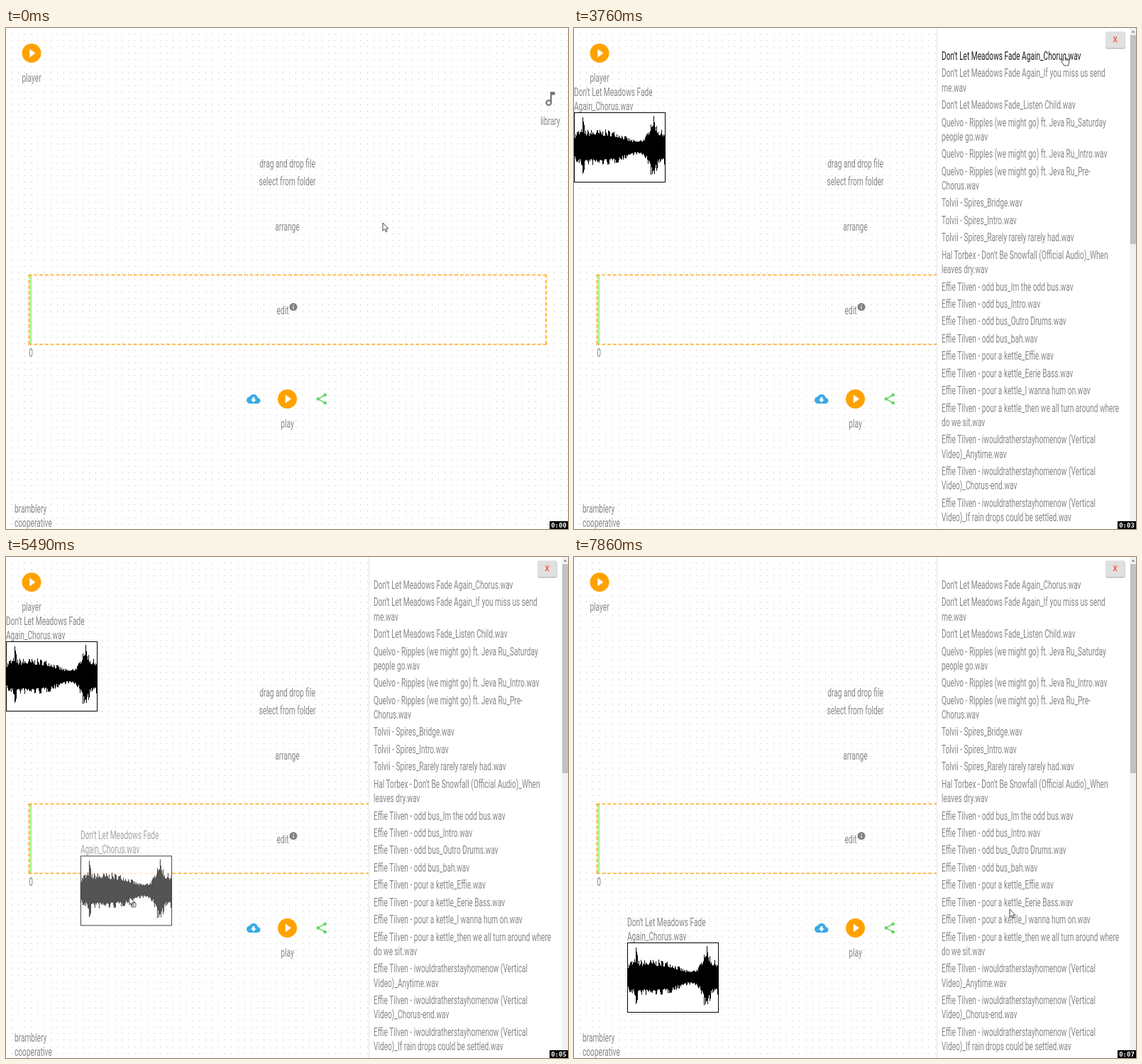
Write an HTML page that moves like this. It is 792x707 px and loops after 8 s.

```html
<!DOCTYPE html>
<html lang="en">
<head>
<meta charset="utf-8">
<title>Sound library</title>
<style>
  html, body { margin: 0; width: 100%; height: 100%; overflow: hidden; background: #fff; }
  svg { display: block; width: 792px; height: 707px; }
  text { font: 400 16px Roboto, "Open Sans", sans-serif; fill: #868686; }
  .mid { text-anchor: middle; }
  .hover text { fill: #1c1c1c; }
  #close text { font-size: 10px; fill: #f22; }
  #clock text { font: 700 9px "DejaVu Sans Mono", monospace; fill: #fff; }
</style>
</head>
<body>
<svg viewBox="0 0 792 707">
  <defs>
    <g id="playIcon">
      <circle r="13.5" fill="#ffa200"/>
      <path d="M-2.7-6V6L5.4 0Z" fill="#fff"/>
    </g>
    <g id="clip"></g>
  </defs>

  <path id="dots" stroke="#bdbdbd"/>
  <g id="page">
    <use href="#playIcon" x="36" y="35.5"/>
    <use href="#playIcon" x="396.5" y="523.5"/>
    <circle id="halo" cx="767" cy="100" r="20" opacity=".055"/>
    <path transform="translate(753.8 86.8) scale(1.1)" fill="#747474" d="M12 3l.01 10.55c-.59-.34-1.27-.55-2-.55C7.79 13 6 14.79 6 17s1.79 4 4.01 4S14 19.21 14 17V7h4V3zm-1.99 16a2 2 0 1 1 0-4 2 2 0 0 1 0 4z"/>
    <rect x="33.6" y="349" width="2.6" height="97" fill="#a9ef90"/>
    <path d="M31.5 348.5H762M31.5 446.5H762M32.4 347.7V447.3M761.2 347.7V447.3" stroke="#ffa716" stroke-width="1.65" stroke-dasharray="4.9 2.9"/>
    <circle cx="405" cy="393.6" r="5.5" fill="#808080"/>
    <path d="M405 390.2v1.3M405 392.8v3.7" stroke="#fff" stroke-width="1.2"/>
    <path transform="translate(339.1 513.8) scale(.81)" fill="#37aae2" d="M19.35 10.04C18.67 6.59 15.64 4 12 4 9.11 4 6.6 5.64 5.35 8.04 2.34 8.36 0 10.91 0 14c0 3.31 2.69 6 6 6h13c2.76 0 5-2.24 5-5 0-2.64-2.05-4.78-4.65-4.96zM17 13l-5 5-5-5h3V9h4v4z"/>
    <g fill="#6ad86a">
      <path d="M449.6 517.8L439.8 523.5L449.6 529.2" fill="none" stroke="#6ad86a" stroke-width="1.5"/>
      <circle cx="449.6" cy="517.8" r="2.4"/>
      <circle cx="439.8" cy="523.5" r="2.4"/>
      <circle cx="449.6" cy="529.2" r="2.4"/>
    </g>
  </g>

  <use id="placed" href="#clip"/>

  <g id="panel">
    <rect x="511" width="281" height="707" fill="#fff"/>
    <path d="M511.5 0V707" stroke="#e6e6e6"/>
    <g id="list"></g>
    <g id="close">
      <rect x="749.5" y="7" width="27" height="23" rx="2.5" opacity=".12"/>
      <rect x="749" y="6" width="28" height="23" rx="2.5" opacity=".16"/>
      <rect x="749" y="5" width="27.5" height="23" rx="2.5" fill="#e0e0e0"/>
      <text class="mid" x="762.7" y="20.2">X</text>
    </g>
    <rect x="783" width="9" height="707" fill="#f1f1f1"/>
    <rect x="784" y="10" width="8" height="295" fill="#c1c1c1"/>
    <path d="M785.5 6.5l2.5-3 2.5 3z" fill="#8a8a8a"/>
  </g>

  <use id="ghost" href="#clip" opacity=".75"/>

  <g id="cursor" stroke="#333" stroke-width=".9" stroke-linejoin="round" fill="#fff">
    <rect id="badge" x="2.5" y="8.5" width="6.5" height="6" rx="1"/>
    <path id="arrow" d="M0 0V11.2L2.6 8.8L4.3 12.8L6 12L4.3 8.2H7.8Z"/>
    <g id="hand">
      <path d="M-1.4 9V1.3a1.4 1.4 0 0 1 2.8 0V6l4.4 1q1.4.4 1.3 2l-.6 3.8-1 3.2h-5.8l-3.6-5.4q-.8-1.8.7-2Z"/>
      <path d="M1.4 6v3M3.4 6.5v2.7M5.2 7v2.4" fill="none"/>
    </g>
  </g>

  <g id="clock">
    <rect x="766" y="696" width="26" height="11"/>
    <text x="768.2" y="705">0:00</text>
  </g>
</svg>

<script>
const LOOP = 8000;
const NARROW = 0.635;   // one horizontal scale for the whole condensed face
const LINE = 20.2;
const $ = id => document.getElementById(id);

function label(parent, str, x, y, cls = "") {
  const el = document.createElementNS("http://www.w3.org/2000/svg", "text");
  el.setAttribute("transform", `translate(${x} ${y}) scale(${NARROW} 1)`);
  el.setAttribute("class", cls);
  el.textContent = str;
  parent.append(el);
}

// Dotted background, each dot on a whole pixel
let dots = "";
for (let y = 8; y < 707; y += 9.1)
  for (let x = 8; x < 792; x += 9.1) dots += `M${Math.round(x)} ${Math.round(y) + 0.5}h1`;
$("dots").setAttribute("d", dots);

// Page labels
[["player", 36, 75.8], ["library", 767, 137.2], ["drag and drop file", 396.5, 197.3],
 ["select from folder", 396.5, 221.9], ["arrange", 396.5, 285.5], ["edit", 390, 403.5],
 ["0", 35, 463.5], ["play", 396.5, 563.9]]
  .forEach(([s, x, y]) => label($("page"), s, x, y, "mid"));
label($("page"), "bramblery", 12, 684);
label($("page"), "cooperative", 12, 684 + LINE);

// Library list; "|" marks a line break
const meadows = "Don't Let Meadows Fade";
const ripples = "Quelvo - Ripples (we might go) ft. Jeva Ru_";
const spires = "Tolvii - Spires_";
const bus = "Effie Tilven - odd bus_";
const kettle = "Effie Tilven - pour a kettle_";
const home = "Effie Tilven - iwouldratherstayhomenow (Vertical|Video)_";
const files = [
  meadows + " Again_Chorus", meadows + " Again_If you miss us send|me",
  meadows + "_Listen Child",
  ripples + "Saturday|people go", ripples + "Intro", ripples + "Pre-|Chorus",
  spires + "Bridge", spires + "Intro", spires + "Rarely rarely rarely had",
  "Hal Torbex - Don't Be Snowfall (Official Audio)_When|leaves dry",
  bus + "Im the odd bus", bus + "Intro", bus + "Outro Drums", bus + "bah",
  kettle + "Effie", kettle + "Eerie Bass", kettle + "I wanna hum on",
  kettle + "then we all turn around where|do we sit",
  home + "Anytime", home + "Chorus-end", home + "If rain drops could be settled"
];
let nextTop = 28.5;
const rows = files.map(name => {
  const el = document.createElementNS("http://www.w3.org/2000/svg", "g");
  const lines = (name + ".wav").split("|");
  const top = nextTop, bottom = top + LINE * lines.length;
  lines.forEach((s, i) => label(el, s, 518, top + 16.5 + i * LINE));
  $("list").append(el);
  nextTop = bottom + 4.27;
  return { el, top, bottom };
});

// Audio clip: title, frame and a seeded waveform
let seed = 7;
const rand = () => (seed = seed * 16807 % 2147483647) / 2147483647;
const bump = (x, center, width) => Math.exp(-(((x - center) / width) ** 2));
const level = x => 25 - 8 * bump(x, 0, 3) + 20 * bump(x, 13, 1.5)
  - 15 * bump(x, 88, 22) + 24 * bump(x, 111, 6);

let wave = "";
for (let x = 0.5; x < 129; x++) {
  const spike = () => level(x) * (0.65 + 0.38 * rand() ** 1.5);
  wave += `M${x} ${168.5 - spike()}V${168.5 + spike()}`;
}
const frame = 'x=".5" y="119.5" width="128" height="98"';
$("clip").innerHTML = `<rect ${frame} fill="#fff"/><path d="${wave}" stroke="#000"/>
  <rect ${frame} fill="none" stroke="#000"/>`;
label($("clip"), meadows, 0, 95.6);
label($("clip"), "Again_Chorus.wav", 0, 95.6 + LINE);

// Stops on a path: time, x, y and, for a slowing arrival, an ease-out power
const pointer = [
  [600, 531, 275], [770, 562, 255], [850, 562, 255], [1380, 669, 162], [1770, 763, 102],
  [2700, 763, 102], [2740, 752, 98], [3230, 691, 37], [3900, 691, 37], [4300, 610, 70],
  [4580, 225, 158], [4970, 66, 167, 2], [5120, 71, 168], [5490, 174, 479], [6000, 147, 592, 2],
  [6370, 138, 590], [6650, 312, 607], [6800, 690, 592], [7070, 690, 508],
  [7320, 626, 506], [7620, 614, 497]
];
const drag = [[5120, 0, 0], [5490, 105, 302], [6000, 76, 424, 2]];

function along(path, t) {
  const i = path.findIndex(p => p[0] > t);
  if (i < 1) return i ? path[path.length - 1].slice(1, 3) : path[0].slice(1, 3);
  const [t0, x0, y0] = path[i - 1], [t1, x1, y1, power = 1] = path[i];
  const k = 1 - (1 - (t - t0) / (t1 - t0)) ** power;
  return [x0 + (x1 - x0) * k, y0 + (y1 - y0) * k];
}

const show = (id, on) => $(id).style.display = on ? "" : "none";
const move = (id, x, y) => $(id).setAttribute("transform", `translate(${x} ${y})`);

function draw(t) {
  const [x, y] = along(pointer, t);
  const open = t >= 2070;
  const dragging = t >= 5200 && t < 6150;
  const dropped = t >= 6150;
  const onLibrary = !open && Math.hypot(x - 767, y - 100) < 20;
  const hovered = rows.find(r => open && x > 515 && y >= r.top && y < r.bottom);
  const hand = onLibrary || !!hovered;

  move("cursor", x, y);
  show("hand", hand);
  show("arrow", !hand);
  show("badge", dragging);
  show("halo", onLibrary);
  rows.forEach(r => r.el.setAttribute("class", r === hovered ? "hover" : ""));

  show("panel", open);
  move("panel", t < 2220 ? 131 : 0, 0);

  show("placed", t >= 3760);
  move("placed", dropped ? 75 : 0, dropped ? 425 : 0);
  show("ghost", dragging);
  move("ghost", ...along(drag, t));

  $("clock").lastElementChild.textContent = "0:0" + Math.floor((t + 180) / 1050);
}

function loop() {
  draw(performance.now() % LOOP);
  requestAnimationFrame(loop);
}
loop();
</script>
</body>
</html>
```
